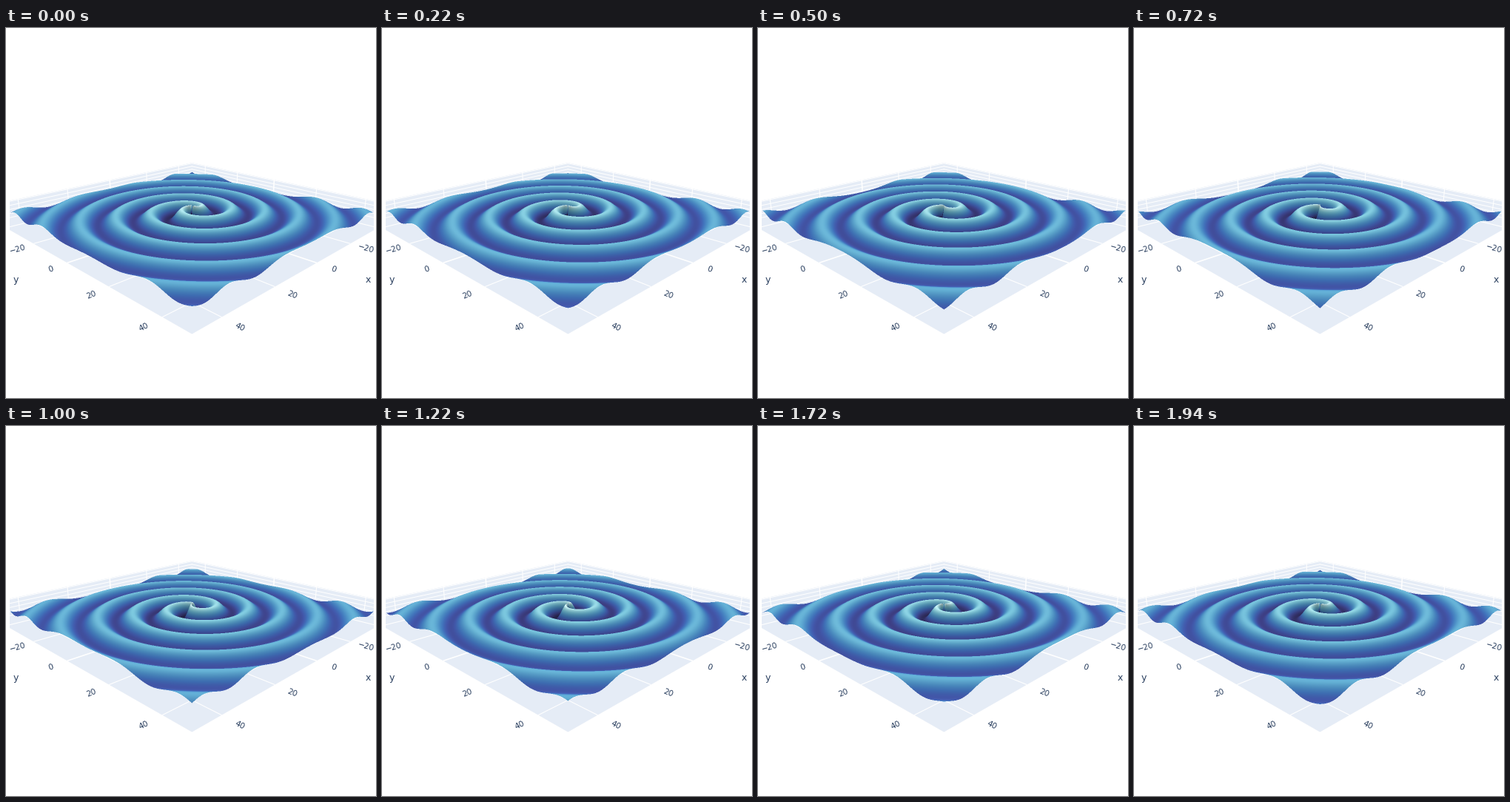
A matplotlib script that plays this animation: 500x500 px, repeating every 1990 ms.

```python
import numpy as np
import matplotlib.pyplot as plt
from matplotlib.animation import FuncAnimation
from matplotlib.colors import LinearSegmentedColormap

W = H = 500
DPI = 100
LOOP, FRAMES = 1990, 36

# Camera: looks at the origin along the x = y diagonal
CX, CY = 251.3, 250.0
FOCAL = H / 2 / np.tan(np.pi / 8)
TILT = 0.331
COS = 1 / np.hypot(1, TILT)
SIN = TILT * COS
DIST = 165.0

# Box, surface and wave, all in axis units
BOX, BOX_Z = 49.1, 3.12
SIDE = 45.0
WAVELENGTH = 11.75
K = 2 * np.pi / WAVELENGTH
CREST = 31.5
ARMS = 2

LEFT, RIGHT, TOP, BOTTOM = 5, 497, 185, 390
SS = 2
SAMPLES = 480
TICKS = (-40, -20, 0, 20, 40)
INK = "#2a3f5f"
PANE = "#e5ecf6"

ICE = LinearSegmentedColormap.from_list("ice", [
    tuple(v / 255 for v in c) for c in (
        (3, 5, 18), (25, 25, 51), (44, 42, 87), (58, 60, 125),
        (62, 83, 160), (62, 109, 178), (72, 134, 187), (89, 159, 196),
        (114, 184, 205), (149, 207, 216), (192, 229, 232), (234, 252, 253))
], N=512)


def project(x, y, z):
    """Screen position of a point in axis units."""
    p, q = (x + y) / np.sqrt(2), (y - x) / np.sqrt(2)
    depth = DIST - p - z * TILT
    return CX + FOCAL / COS * q / depth, CY + FOCAL * (p * TILT - z) / depth


fig = plt.figure(figsize=(W / DPI, H / DPI), dpi=DPI, facecolor="white")
ax = fig.add_axes([LEFT / W, 0, (RIGHT - LEFT) / W, 1])
ax.axis("off")


def pane(*corners):
    pts = [project(*c) for c in corners]
    ax.fill(*zip(*pts), color=PANE, lw=0.5, zorder=1)


def line(a, b, px=1.0):
    (x0, y0), (x1, y1) = project(*a), project(*b)
    ax.plot([x0, x1], [y0, y1], color="white", lw=px * 72 / DPI, zorder=2)


def label(x, y, text, px, angle=0):
    ax.text(x, y, text, color=INK, size=px * 72 / DPI, rotation=angle,
            ha="center", va="center", family="DejaVu Sans", zorder=4)


def draw_box():
    b, h = BOX, BOX_Z
    pane((-b, -b, -h), (b, -b, -h), (b, b, -h), (-b, b, -h))
    pane((-b, -b, -h), (b, -b, -h), (b, -b, h), (-b, -b, h))
    pane((-b, -b, -h), (-b, b, -h), (-b, b, h), (-b, -b, h))
    for t in TICKS:
        px = 1.6 if t == 0 else 1.1
        line((t, -b, -h), (t, b, -h), px)
        line((-b, t, -h), (b, t, -h), px)
        line((t, -b, -h), (t, -b, h), px)
        line((-b, t, -h), (-b, t, h), px)
    for z in np.arange(-3, 3.1, 1.5):
        line((-b, -b, z), (b, -b, z))
        line((-b, -b, z), (-b, b, z))


def draw_labels():
    horizon = CY - FOCAL * TILT
    for t in TICKS[1:]:
        x, y = project(t, 54.3, -3.4)
        angle = np.degrees(np.arctan2(y - horizon, x - CX + FOCAL / COS))
        text = str(t).replace("-", "\u2212")
        label(x, y, text, 10.6, -angle)
        label(2 * CX - x, y, text, 10.6, angle)
    label(13, 340.5, "y", 12.5)
    label(489.5, 341, "x", 12.5)


draw_box()
draw_labels()

# Each screen column is sampled from the near edge of the surface to the far one
cols = LEFT + (np.arange((RIGHT - LEFT) * SS) + 0.5) / SS - CX
rows = TOP + (np.arange((BOTTOM - TOP) * SS) + 0.5) / SS
g = np.abs(cols) * COS / FOCAL
reach = np.maximum(SIDE * np.sqrt(2) - g * DIST, 0)
near, far = reach / (1 - g), -reach / (1 + g)
P = near[:, None] + (far - near)[:, None] * np.linspace(0, 1, SAMPLES)
Q = cols[:, None] * COS / FOCAL * (DIST - P)
R = np.maximum(np.hypot(P, Q), 0.3)
PHASE = K * (R - CREST) - ARMS * np.arctan2(Q, P)
AMP = 7.4 / np.sqrt(R + 6)
SLOPE_P = AMP * (K * P / R + ARMS * Q / R**2)
SLOPE_SQ = AMP**2 * (K**2 + ARMS**2 / R**2)


def render(turn):
    """RGBA picture of the wave after the given part of a period."""
    psi = PHASE - 2 * np.pi * turn
    sin = np.sin(psi)
    z = AMP * np.cos(psi)
    facing = (COS - SIN * SLOPE_P * sin) / np.sqrt(1 + SLOPE_SQ * sin**2)
    light = 0.70 + 0.41 * np.maximum(facing, 0)
    y = CY + FOCAL * (P * TILT - z) / (DIST - P - z * TILT)
    height = -np.minimum.accumulate(y, axis=1)

    tone = np.empty((len(cols), len(rows)))
    lit = np.empty_like(tone)
    for c, h in enumerate(height):
        tone[c] = np.interp(-rows, h, z[c], left=np.nan, right=np.nan)
        lit[c] = np.interp(-rows, h, light[c])
    tone, lit = tone.T, lit.T
    solid = np.isfinite(tone)
    level = np.clip(0.5 + np.where(solid, tone, 0) / 6.2, 0, 1)
    rgb = np.clip(ICE(level)[..., :3] * lit[..., None], 0, 1)

    rgba = np.dstack([rgb * solid[..., None], solid.astype(float)])
    n, m = rgba.shape[:2]
    rgba = rgba.reshape(n // SS, SS, m // SS, SS, 4).mean(axis=(1, 3))
    rgba[..., :3] /= np.maximum(rgba[..., 3:], 1e-6)
    return np.clip(rgba, 0, 1)


image = ax.imshow(render(0), extent=(LEFT, RIGHT, BOTTOM, TOP), aspect="auto",
                  interpolation="nearest", zorder=3)
ax.set_xlim(LEFT, RIGHT)
ax.set_ylim(H, 0)


def update(i):
    image.set_data(render(i / (FRAMES - 1)))
    return image,


anim = FuncAnimation(fig, update, frames=FRAMES, interval=LOOP / FRAMES,
                     repeat=True, repeat_delay=0, blit=False)
plt.show()
```
